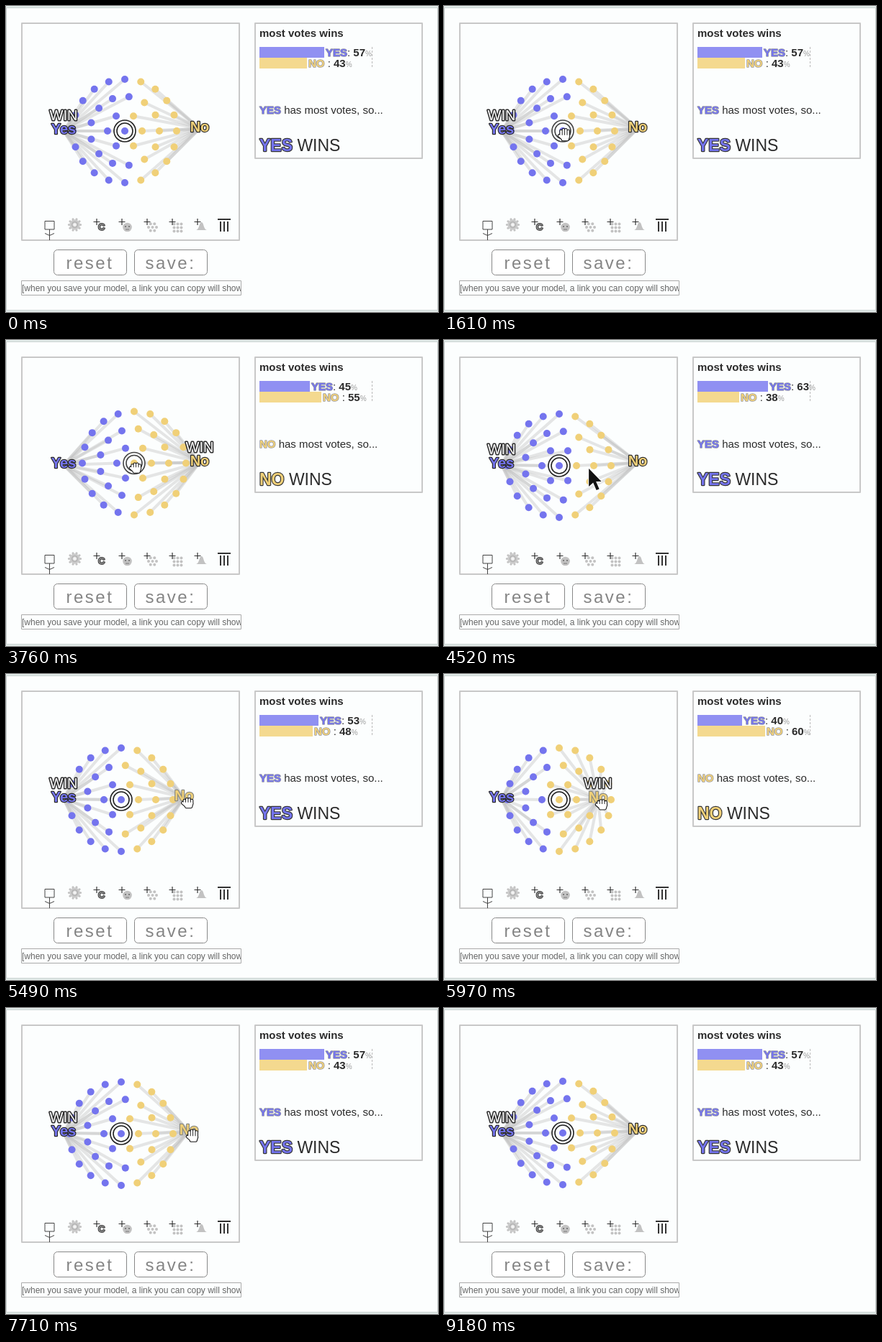
Write an HTML page with a canvas that moves like this. It is 600 px wide and 426 px high and loops after 9.89 s.

```html
<!DOCTYPE html>
<html lang="en">
<head>
<meta charset="utf-8">
<title>Voting model</title>
<style>
html, body { margin: 0; width: 100%; height: 100%; overflow: hidden; background: #fcfefe; }
canvas { display: block; }
</style>
</head>
<body>
<canvas id="stage" width="600" height="426"></canvas>
<script>
const ctx = document.getElementById('stage').getContext('2d');
const LOOP = 9890, RESET = 8700, TAU = Math.PI * 2;
const BLUE = '#7474ee', YELLOW = '#f0d078', INK = '#2b2b2b', ICON = '#c2c2c2';
const FONT = '"Liberation Sans", Arial, sans-serif';
const YES = { x: 80, y: 173 };

// Voters stand evenly spaced on concentric rings around the group centre.
const voters = [{ dx: 0, dy: 0 }];
[6, 13, 20].forEach((count, i) => {
  for (let k = 0; k < count; k++) {
    const a = k / count * TAU, radius = 24 * (i + 1);
    voters.push({ dx: radius * Math.cos(a), dy: radius * Math.sin(a) });
  }
});

// Progress from 0 to 1 in equal jumps, the first one at the start time.
const stepped = (t, start, steps, gap) =>
  Math.min(steps, Math.max(0, Math.floor((t - start) / gap) + 1)) / steps;
const smooth = k => k * k * (3 - 2 * k);
const between = (a, b, k) => ({ x: a.x + (b.x - a.x) * k, y: a.y + (b.y - a.y) * k });

function groupAt(t) {
  if (t < 2280 || t >= RESET) return { x: 165, y: 174 };
  const x = 165 + 26 * smooth(stepped(t, 2280, 4, 140)) - 31 * stepped(t, 3490, 6, 135) ** 1.25;
  return { x, y: 175 - (x - 160) ** 2 / 91 };
}

function noAt(t) {
  const pull = 55 * smooth(stepped(t, 5250, 7, 120)) - 40 * smooth(stepped(t, 6620, 8, 120));
  const offset = t < RESET ? pull : 0;
  return { x: 269 - offset, y: 169.5 + offset / 15 };
}

function pointerAt(t) {
  const overReset = { x: 120, y: 345 };
  if (t < 1470) return between({ x: 30, y: 425 }, { x: 174, y: 187 }, stepped(t, 530, 7, 130));
  if (t < 5000) return between({ x: 160, y: 179 }, { x: 256, y: 179 }, stepped(t, 4280, 7, 120));
  if (t < RESET) return between({ x: 259, y: 177 }, overReset, stepped(t, 7830, 7, 120));
  return between(overReset, { x: 90, y: 420 }, stepped(t, RESET, 4, 120));
}

function dot(x, y, r, color) {
  ctx.fillStyle = color;
  ctx.beginPath();
  ctx.arc(x, y, r, 0, TAU);
  ctx.fill();
}

function ring(x, y, r, color, width) {
  ctx.strokeStyle = color;
  ctx.lineWidth = width;
  ctx.beginPath();
  ctx.arc(x, y, r, 0, TAU);
  ctx.stroke();
}

function lines(d, color, width) {
  ctx.strokeStyle = color;
  ctx.lineWidth = width;
  ctx.stroke(new Path2D(d));
}

function box(x, y, w, h, color, width) {
  ctx.strokeStyle = color;
  ctx.lineWidth = width;
  ctx.strokeRect(x, y, w, h);
}

// Writes text and returns the x where it ends.
function write(text, x, y, font, color, outline = 0, outlineColor = INK) {
  ctx.font = `${font} ${FONT}`;
  if (outline) {
    ctx.lineJoin = 'round';
    ctx.lineWidth = outline;
    ctx.strokeStyle = outlineColor;
    ctx.strokeText(text, x, y);
  }
  ctx.fillStyle = color;
  ctx.fillText(text, x, y);
  return x + ctx.measureText(text).width;
}

function colorName(name, x, y, size) {
  const edge = size > 15 ? '#333' : 'rgba(50,50,70,.5)';
  return write(name, x, y, `bold ${size}px`, name === 'YES' ? BLUE : YELLOW, size / 10, edge);
}

function button(text, x, textX, hovered) {
  ctx.beginPath();
  ctx.roundRect(x + .5, 339.5, 101, 35, 5);
  ctx.fillStyle = hovered ? '#eee' : '#fff';
  ctx.fill();
  ctx.strokeStyle = '#888';
  ctx.lineWidth = 1;
  ctx.stroke();
  ctx.letterSpacing = '2.5px';
  write(text, textX, 366, '24px', '#858585');
  ctx.letterSpacing = '0px';
}

function toolbar() {
  box(54, 299.5, 13, 11.5, '#444', 1);
  lines('M60.5 311V326M54 316.5L60.5 319.5L67 316.5', '#444', 1);

  for (let a = 0; a < TAU; a += TAU / 10) dot(95.5 + 8 * Math.cos(a), 304.5 + 8 * Math.sin(a), 1.6, ICON);
  dot(95.5, 304.5, 7.2, '#cacaca');
  ring(95.5, 304.5, 4, '#aaa', 1);
  dot(95.5, 304.5, 2.3, '#f4f4f4');

  write('C', 128, 311.5, 'bold 13px', '#888', 2, '#444');

  dot(168.5, 308, 6.3, ICON);
  dot(166, 307, 1, '#666');
  dot(171, 307, 1, '#666');
  lines('M166 311H171', '#777', 1);

  dot(203.5, 308, 2, ICON);
  for (let a = 0; a < TAU - .1; a += TAU / 6) dot(203.5 + 5.5 * Math.cos(a), 308 + 5.5 * Math.sin(a), 2, ICON);
  for (let i = 0; i < 9; i++) dot(233.5 + i % 3 * 5, 303.5 + Math.floor(i / 3) * 5, 2, ICON);

  ctx.fillStyle = ICON;
  ctx.fill(new Path2D('M264 312C269 311 268 301 271.5 301C275 301 274 311 279 312Z'));

  for (let x = 126; x <= 266; x += 35) lines(`M${x - 4.5} 300.5h9m-4.5-4.5v9`, '#333', 1.2);
  lines('M294 297H312M298 300V314M303 300V314M308 300V314', '#333', 2);
}

function page(hovered) {
  ctx.fillStyle = '#e3ecea';
  ctx.fillRect(0, 0, 600, 426);
  ctx.fillStyle = '#fcfefe';
  ctx.fillRect(0, 2, 600, 422);
  box(.5, 2.5, 599, 421, '#c8d1cf', 1);
  box(22, 24, 302, 302, '#c8c8c8', 2);
  box(346, 24, 232, 188, '#c8c8c8', 2);
  toolbar();
  button('reset', 66, 83.5, hovered);
  button('save:', 178, 193.5, false);
  box(21.5, 382.5, 305, 20, '#aaa', 1);
  ctx.save();
  ctx.beginPath();
  ctx.rect(22, 383, 304, 19);
  ctx.clip();
  write('[when you save your model, a link you can copy will show', 22, 397, '12px', '#666');
  ctx.restore();
}

function resultBar(name, gap, count, y, color) {
  const share = count / voters.length, width = Math.floor(share * 157);
  ctx.fillStyle = color;
  ctx.fillRect(352, y, width, 15);
  let x = colorName(name, 354 + width, y + 13, 15);
  x = write(gap, x, y + 13, '15px', INK);
  x = write(Math.round(share * 100), x, y + 13, 'bold 15px', INK);
  write('%', x, y + 13, '10px', '#999');
}

function results(yesCount) {
  const noCount = voters.length - yesCount, winner = yesCount > noCount ? 'YES' : 'NO';
  write('most votes wins', 352, 43, 'bold 15px', INK);
  resultBar('YES', ': ', yesCount, 57, '#9090f2');
  resultBar('NO', ' : ', noCount, 72, '#f4d98f');
  ctx.setLineDash([3, 2]);
  lines('M508.5 57V87', '#bbb', 1);
  ctx.setLineDash([]);
  write(' has most votes, so...', colorName(winner, 352, 150, 15), 150, '15px', INK);
  write(' WINS', colorName(winner, 352, 202, 23), 202, '23px', INK);
}

function candidate(name, { x, y }, color, wins, edge = INK) {
  ctx.textAlign = 'center';
  write(name, x, y + 5, 'bold 20px', color, 2.4, edge);
  if (wins) write('WIN', x, y - 14, '20px', '#fff', 3);
  ctx.textAlign = 'left';
}

function model(t) {
  const group = groupAt(t), no = noAt(t);
  const crowd = voters.map(({ dx, dy }) => {
    const x = group.x + dx, y = group.y + dy;
    return { x, y, isYes: x < (YES.x + no.x) / 2 };
  });
  const yesCount = crowd.filter(v => v.isYes).length, yesWins = yesCount > crowd.length / 2;

  for (const v of crowd) {
    const choice = v.isYes ? YES : no;
    lines(`M${v.x} ${v.y}L${choice.x} ${choice.y + 1}`, 'rgba(190,190,190,.4)', 4);
  }
  dot(group.x, group.y, 15, '#fcfefe');
  const ringColor = t >= 1470 && t < 4280 ? '#444' : '#222';
  ring(group.x, group.y, 15, ringColor, 1.6);
  ring(group.x, group.y, 11, ringColor, 1.6);
  for (const v of crowd) dot(v.x, v.y, 5, v.isYes ? BLUE : YELLOW);

  candidate('Yes', YES, BLUE, yesWins);
  candidate('No', no, YELLOW, !yesWins, t >= 5000 && t < 7830 ? '#8a8a80' : INK);
  return yesCount;
}

function hand(x, y, closed) {
  const reach = closed ? 2 : 5;
  let d = 'M-3.5 2H6L4.5 7H-2ZM-7 1.5L-3 5';
  for (let i = 0; i < 4; i++) d += `M${3.4 * i - 4.5} 2V${-reach - 2 * Math.sin(i / 3 * Math.PI)}`;
  ctx.save();
  ctx.translate(x, y);
  ctx.lineCap = ctx.lineJoin = 'round';
  lines(d, '#111', 4.6);
  lines(d, '#fff', 2.5);
  ctx.fillStyle = '#fff';
  ctx.fill(new Path2D(d));
  ctx.restore();
}

function arrow({ x, y }) {
  const shape = new Path2D('M0 0V25L6 19.5L10.5 30L14.5 28.5L10 18H17.5Z');
  ctx.save();
  ctx.translate(x, y);
  ctx.strokeStyle = '#fff';
  ctx.lineWidth = 2;
  ctx.stroke(shape);
  ctx.fillStyle = '#111';
  ctx.fill(shape);
  ctx.restore();
}

function cursor(t, pointer) {
  const group = groupAt(t), no = noAt(t);
  if (t >= 1470 && t < 4400) hand(group.x + 2, group.y + 5, t >= 2010 && t < 4280);
  else if (t >= 5000 && t < 7830) hand(no.x + 5, no.y + 7, t >= 5250 && t < 7710);
  else arrow(pointer);
}

function draw() {
  const t = performance.now() % LOOP, pointer = pointerAt(t);
  const visible = t >= 530 && t < 9180;
  const hovered = visible && pointer.x > 66 && pointer.x < 168 && pointer.y > 339 && pointer.y < 375;
  page(hovered);
  results(model(t));
  if (visible) cursor(t, pointer);
  requestAnimationFrame(draw);
}
draw();
</script>
</body>
</html>
```
